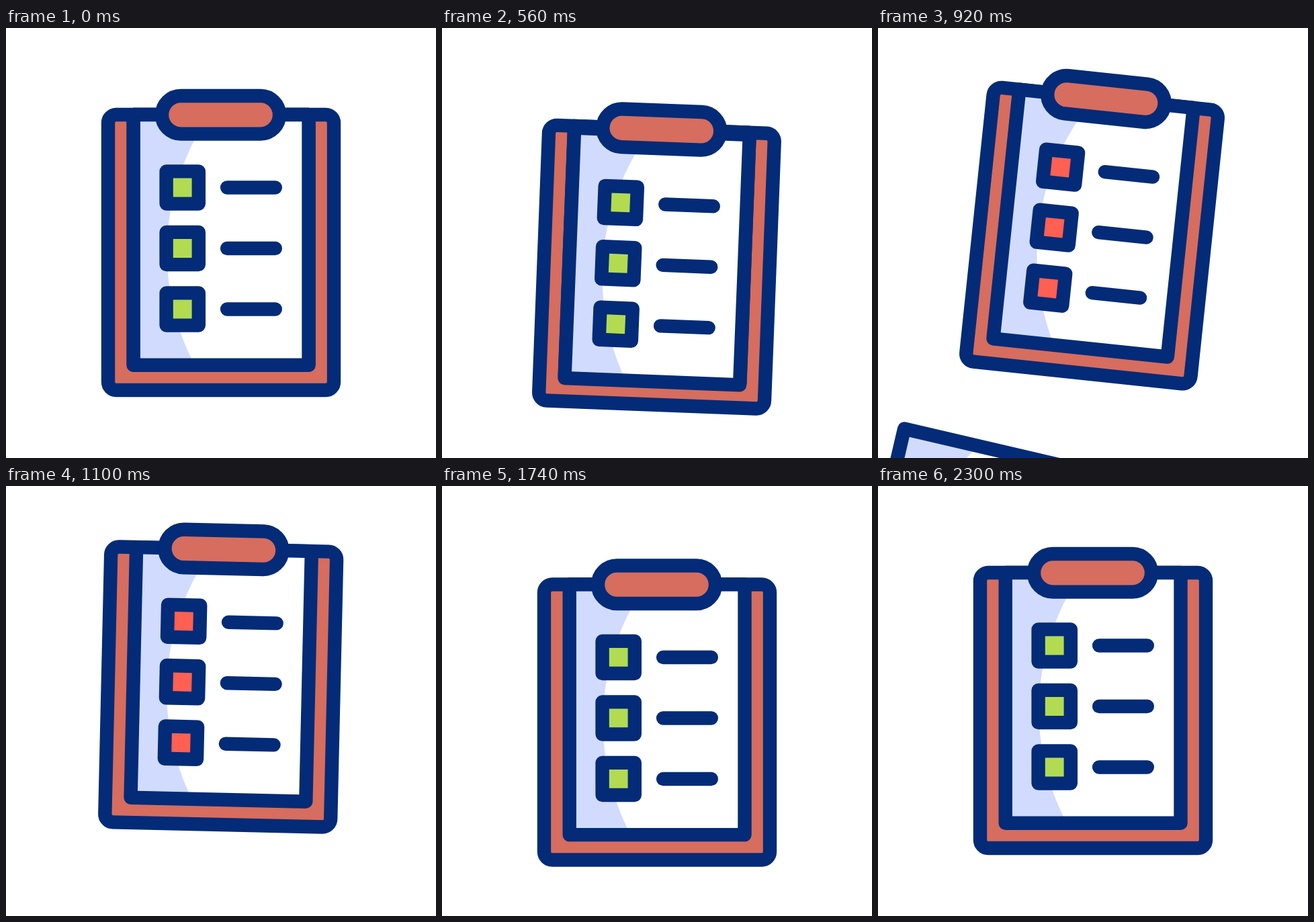
These frames come from a looping animation (640 px wide and 640 px high, 2420 ms). An HTML page with a canvas:

```html
<!DOCTYPE html>
<html lang="en">
<head>
<meta charset="utf-8">
<title>Clipboard checklist</title>
<style>
  html, body { margin: 0; height: 100%; overflow: hidden; background: #fff; }
  canvas { display: block; width: 100vw; height: 100vh; }
</style>
</head>
<body>
<canvas id="stage" width="640" height="640"></canvas>
<script>
const ctx = document.getElementById('stage').getContext('2d');
const LOOP = 2420;
const NAVY = '#032b77', CORAL = '#d66d5f', RED = '#ff6052', GREEN = '#b2db52', SHADE = '#d1dbfd';
const TICKS = [1360, 1480, 1600];   // when each box on the fresh page turns green
const FALL = 540;                   // when the top page lets go

const smooth = u => (1 - Math.cos(Math.PI * u)) / 2;

// cubic-bezier(.25, .1, .25, 1)
function ease(u) {
  const at = (a, b, s) => 3 * a * s * (1 - s) ** 2 + 3 * b * s * s * (1 - s) + s ** 3;
  let lo = 0, hi = 1;
  for (let i = 0; i < 24; i++) {
    const mid = (lo + hi) / 2;
    if (at(.25, .25, mid) < u) lo = mid; else hi = mid;
  }
  return at(.1, 1, lo);
}

// Each key: [time, value, easing towards it]
const LIFT = [[220, 0], [500, 25], [1400, -39.8, ease], [1660, 24.5], [1960, -17], [2300, 0]];
const TILT = [[450, 0], [760, 7.7], [1410, -4.15], [1740, 0]];

function track(keys, t) {
  if (t <= keys[0][0]) return keys[0][1];
  for (let i = 1; i < keys.length; i++) {
    const [t0, v0] = keys[i - 1], [t1, v1, fn = smooth] = keys[i];
    if (t < t1) return v0 + (v1 - v0) * fn((t - t0) / (t1 - t0));
  }
  return keys[keys.length - 1][1];
}

function box(x, y, w, h, r, fill) {
  ctx.beginPath();
  if (r) ctx.roundRect(x, y, w, h, r); else ctx.rect(x, y, w, h);
  ctx.fillStyle = fill;
  ctx.fill();
  ctx.stroke();
}

// Move and turn about the stage centre
function place(x, y, deg) {
  ctx.translate(320 + x, 320 + y);
  ctx.rotate(deg * Math.PI / 180);
  ctx.translate(-320, -320);
}

function page(colors) {
  ctx.fillStyle = '#fff';
  ctx.fillRect(189.7, 129, 260.8, 372.7);
  ctx.save();
  ctx.beginPath();
  ctx.rect(189.7, 129, 260.8, 372.7);
  ctx.clip();
  ctx.fillStyle = SHADE;
  ctx.fillRect(189.7, 129, 260.8, 372.7);
  ctx.beginPath();
  ctx.arc(601.5, 334, 362, 0, 7);
  ctx.fillStyle = '#fff';
  ctx.fill();
  ctx.restore();
  box(189.7, 129, 260.8, 372.7, 0, 'transparent');

  colors.forEach((color, i) => {
    const y = 237.5 + i * 90.5;
    box(238.6, y - 24.1, 48.2, 48.2, 0, color);
    ctx.beginPath();
    ctx.moveTo(329.1, y);
    ctx.lineTo(400.8, y);
    ctx.stroke();
  });
}

function draw(t) {
  ctx.fillStyle = '#fff';
  ctx.fillRect(0, 0, 640, 640);
  ctx.strokeStyle = NAVY;
  ctx.lineWidth = 20.4;
  ctx.lineJoin = ctx.lineCap = 'round';

  ctx.save();
  place(0, track(LIFT, t), track(TILT, t));
  box(152, 129, 336, 410, 12, CORAL);
  page(TICKS.map(at => t < at ? RED : GREEN));

  const u = Math.max(0, t - FALL) / 240;
  if (u < 2.2) {
    ctx.save();
    place(-39 * u ** 2.8, 232.7 * u ** 1.8, 3.4 * u ** 1.6);
    page([GREEN, GREEN, GREEN]);
    ctx.restore();
  }

  box(232, 101, 175, 56.6, 28.3, CORAL);
  ctx.restore();
}

const start = performance.now();
function tick() {
  draw((performance.now() - start) % LOOP);
  requestAnimationFrame(tick);
}
tick();
</script>
</body>
</html>
```
